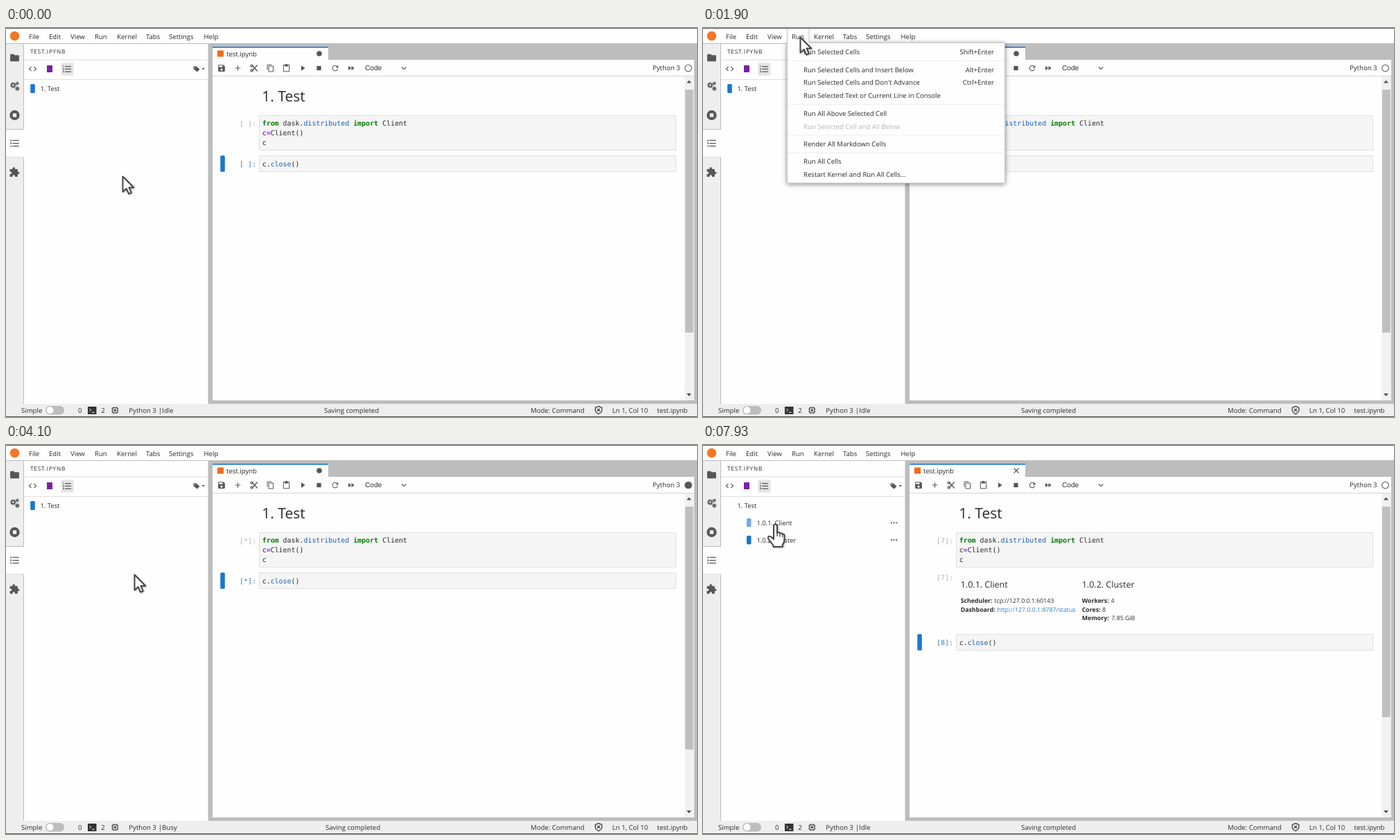
Animation, 997 px wide and 562 px high, one loop 8 s. Source, as an HTML page:

```html
<!DOCTYPE html>
<html lang="en">
<head>
<meta charset="utf-8">
<title>Notebook outline</title>
<style>
html, body { margin: 0; width: 100%; height: 100%; overflow: hidden; background: #fefefe; }
svg { display: block; width: 100vw; height: 100vh; }
text { font: 9.6px "Open Sans", "Noto Sans", sans-serif; fill: #2b2b2b; white-space: pre; text-rendering: geometricPrecision; }
.code { font: 9.94px "DejaVu Sans Mono", monospace; }
.keyword { font-weight: bold; fill: #008000; }
.operator { font-weight: bold; fill: #aa22ff; }
.property { fill: #1a5fb4; }
.prompt { fill: #b0b0b0; }
.active { fill: #307fc1; }
.toc { font-size: 9.4px; }
.h1 { font-size: 21px; }
.h3 { font-size: 12.5px; font-weight: 500; }
.out { font-size: 8.78px; }
.bold { font-weight: bold; }
.link { fill: #2a7fcb; }
.caps { font-size: 8.2px; letter-spacing: .8px; }
.select { font: 10.1px "Liberation Sans", Arial, sans-serif; }
.disabled { fill: #b5b5b5; }
.menu-box { filter: drop-shadow(0 1px 3px rgba(0,0,0,.35)) drop-shadow(0 2px 4px rgba(0,0,0,.15)); }
#cursor { filter: drop-shadow(1px 1px 1px rgba(0,0,0,.3)); }
</style>
</head>
<body>
<svg id="stage" viewBox="0 0 997 562" preserveAspectRatio="none"></svg>
<script>
const LOOP = 8000;
const WHITE = '#fefefe', GRAY = '#bdbdbd', PALE = '#eeeeee', INK = '#565656';
const BLUE = '#1976d2', LIGHT_BLUE = '#72a9e6';

const text = (x, y, content, cls = '', extra = '') =>
  `<text x="${x}" y="${y}" class="${cls}" ${extra}>${content}</text>`;
const rect = (x, y, w, h, fill, extra = '') =>
  `<rect x="${x}" y="${y}" width="${w}" height="${h}" fill="${fill}" ${extra}/>`;
const circle = (x, y, r, fill, extra = '') =>
  `<circle cx="${x}" cy="${y}" r="${r}" fill="${fill}" ${extra}/>`;
const path = (d, fill, extra = '') => `<path d="${d}" fill="${fill}" ${extra}/>`;
const line = (d, width = 1, color = INK, extra = '') =>
  path(d, 'none', `stroke="${color}" stroke-width="${width}" ${extra}`);
const group = (id, content) => `<g id="${id}">${content}</g>`;
// Icons are drawn on a 24 unit grid and centred on (x, y).
const icon = (x, y, size, d) =>
  path(d, INK, `fill-rule="evenodd" transform="translate(${x - size / 2} ${y - size / 2}) scale(${size / 24})"`);
const span = (cls, content) => `<tspan class="${cls}">${content}</tspan>`;

const gear = (x, y, r) =>
  circle(x, y, r, 'none', `stroke="${INK}" stroke-width="1.8"`) +
  circle(x, y, r + 1.3, 'none', `stroke="${INK}" stroke-width="1.5" pathLength="16" stroke-dasharray="1 1"`);

const ICONS = {
  folder: 'M10 4H4c-1.1 0-2 .9-2 2v12c0 1.1.9 2 2 2h16c1.1 0 2-.9 2-2V8c0-1.1-.9-2-2-2h-8z',
  list: 'M2 4h3v3H2zM2 10.5h3v3H2zM2 17h3v3H2zM7 4.5h15v2H7zM7 11h15v2H7zM7 17.5h15v2H7z',
  puzzle: 'M20.5 11H19V7a2 2 0 0 0-2-2h-4V3.5a2.5 2.5 0 0 0-5 0V5H4a2 2 0 0 0-2 2v3.8h1.5a2.7 2.7 0 0 1 0 5.4H2V20a2 2 0 0 0 2 2h3.8v-1.5a2.7 2.7 0 0 1 5.4 0V22H17a2 2 0 0 0 2-2v-4h1.5a2.5 2.5 0 0 0 0-5z',
  code: 'M9.4 16.6L4.8 12l4.6-4.6L8 6l-6 6 6 6zM14.6 16.6l4.6-4.6-4.6-4.6L16 6l6 6-6 6z',
  numbered: 'M2 17h2v.5H3v1h1v.5H2v1h3v-4H2zM3 8h1V4H2v1h1zM2 11h1.8L2 13.1v.9h3v-1H3.2L5 10.9V10H2zM7 5v2h14V5zM7 19h14v-2H7zM7 13h14v-2H7z',
  tag: 'M2 4h9l11 9.500-8.500 8.500L2 12zM6 6a1.500 1.500 0 1 0 .1 0z',
  save: 'M17 3H5a2 2 0 0 0-2 2v14a2 2 0 0 0 2 2h14a2 2 0 0 0 2-2V7zM12 19a3 3 0 1 1 0-6 3 3 0 0 1 0 6zM15 9H5V5h10z',
  add: 'M19 13h-6v6h-2v-6H5v-2h6V5h2v6h6z',
  copy: 'M16 1H4a2 2 0 0 0-2 2v14h2V3h12zM19 5H8a2 2 0 0 0-2 2v14a2 2 0 0 0 2 2h11a2 2 0 0 0 2-2V7a2 2 0 0 0-2-2zM19 21H8V7h11z',
  paste: 'M19 2h-4.2a3 3 0 0 0-5.600 0H5a2 2 0 0 0-2 2v16a2 2 0 0 0 2 2h14a2 2 0 0 0 2-2V4a2 2 0 0 0-2-2zM19 20H5V4h2v3h10V4h2z',
  play: 'M8 5v14l11-7z',
  stop: 'M6 6h12v12H6z',
  refresh: 'M17.65 6.35A8 8 0 1 0 19.73 14h-2.08A6 6 0 1 1 12 6c1.66 0 3.14.69 4.22 1.78L13 11h7V4z',
  forward: 'M4 18l8.5-6L4 6zM13 6v12l8.5-6z'
};

function frameMarkup() {
  return rect(0, 0, 997, 562, WHITE)
    + rect(0, 22, 997, 521, GRAY)
    + rect(0, 23, 25, 520, PALE)
    + rect(25, 23, 1, 520, GRAY)
    + rect(26, 23, 265.5, 520, WHITE)
    + rect(0, 146, 26, 41, GRAY) + rect(0, 147, 26, 39.5, WHITE)
    + rect(298, 27, 167, 20, WHITE) + rect(298, 27, 167, 1.6, BLUE)
    + rect(298, 46, 695, 492, WHITE) + rect(298, 69, 695, 1, '#d4d4d4')
    + rect(979, 70, 14, 468, '#f1f1f1')
    + path('M982 79.500h7l-3.500-4zM982 528h7l-3.500 4z', '#505050')
    + rect(0, 543, 997, 18, PALE)
    + rect(0, 0, 997, .8, '#333') + rect(0, 561, 997, 1, '#555');
}

function leftMarkup() {
  return circle(12.5, 11.5, 6.8, '#f37726')
    + icon(12.5, 43, 15.5, ICONS.folder)
    + gear(10.3, 82.6, 2.3) + gear(16.3, 87.6, 1.3) + gear(16.3, 80, .7)
    + circle(12.5, 126, 7.2, INK) + rect(9.8, 123.3, 5.4, 5.4, PALE)
    + icon(12.5, 166.5, 15, ICONS.list)
    + icon(12.2, 208.3, 16, ICONS.puzzle)
    + text(35, 37.3, 'TEST.IPYNB', 'caps')
    + rect(26, 45.5, 265.5, 1, '#dedede') + rect(26, 74, 265.5, 1, '#dedede')
    + icon(38.5, 59, 14, ICONS.code)
    + rect(59, 54, 8, 10, '#7b1fa2')
    + rect(79.5, 50.5, 18, 18, '#e4e4e4') + icon(88.3, 59.3, 15, ICONS.numbered)
    + icon(275, 59, 11, ICONS.tag) + path('M282.500 58h4.500l-2.250 2.500z', INK)
    + text(49.5, 91.2, '1. Test', 'toc')
    + rect(35.2, 81, 6.6, 13, BLUE, 'id="mark1" rx="1.5"');
}

function tocMarkup() {
  const row = (y, label, id) => text(77.5, y + 3.8, label, 'toc')
    + [271.8, 275.5, 279.2].map(x => circle(x, y, 1.1, INK)).join('')
    + rect(63, y - 6.3, 6.5, 12.6, BLUE, `id="${id}" rx="1.5"`);
  return row(112.3, '1.0.1. Client', 'mark2') + row(137.2, '1.0.2. Cluster', 'mark3');
}

function toolbarMarkup() {
  const tools = [[311, 'save', 13], [334.5, 'add', 13], [381.5, 'copy', 12], [404.5, 'paste', 12.5],
    [428, 'play', 12.5], [451.5, 'stop', 12.5], [475, 'refresh', 13], [498, 'forward', 12]];
  return rect(305, 32.5, 9, 9, '#ef6c1a') + text(318, 41, 'test.ipynb')
    + circle(452, 37, 3.8, INK, 'id="dirty"')
    + group('close', line('M448.500 33.500l7 7m0-7l-7 7', 1.2))
    + tools.map(([x, name, size]) => icon(x, 58, size, ICONS[name])).join('')
    + line('M355 54l7.800 8.500M362.800 53.500l-7.800 8.500', 1.3)
    + [54.6, 61.4].map(y => circle(354.6, y, 1.6, 'none', `stroke="${INK}" stroke-width="1.200"`)).join('')
    + text(518, 61.3, 'Code', 'select') + line('M570.800 56.500l3.200 3 3.200-3', 1.2)
    + text(933, 61, 'Python 3')
    + circle(984.5, 58, 4.8, 'none', `id="kernel" stroke="${INK}" stroke-width="1.100"`);
}

function notebookMarkup() {
  const border = 'stroke="#e0e0e0"';
  return text(369.3, 106.3, '1. Test', 'h1')
    + text(337, 141.5, '', 'code prompt', 'id="prompt1"')
    + rect(365.5, 126.5, 601, 50, '#f5f5f5', border)
    + text(369.7, 141.3, `${span('keyword', 'from')} dask.${span('property', 'distributed')} ${span('keyword', 'import')} Client`, 'code')
    + text(369.7, 155.3, `c${span('operator', '=')}Client()`, 'code')
    + text(369.7, 169.3, 'c', 'code')
    + group('output',
      text(337, 195.3, '[7]:', 'code prompt')
      + text(371.7, 205.6, '', 'h3', 'id="head1"') + text(546.7, 205.6, '', 'h3', 'id="head2"')
      + text(371.7, 228.2, 'Scheduler:', 'out bold') + text(420.4, 228.2, 'tcp://127.0.0.1:60143', 'out')
      + text(371.7, 241, 'Dashboard:', 'out bold') + text(424.3, 241, 'http://127.0.0.1:8787/status', 'out link')
      + text(546.7, 228.2, 'Workers:', 'out bold') + text(588.5, 228.2, '4', 'out')
      + text(546.7, 241, 'Cores:', 'out bold') + text(576, 241, '8', 'out')
      + text(546.7, 253.3, 'Memory:', 'out bold') + text(589.3, 253.3, '7.85 GiB', 'out'))
    + group('cell2',
      rect(309.3, 184.3, 6.5, 23.4, BLUE, 'rx="1.500"')
      + text(337, 199.7, '', 'code active', 'id="prompt2"')
      + rect(365.5, 184.5, 601, 23, '#f5f5f5', border)
      + text(369.7, 199.5, `c.${span('property', 'close')}()`, 'code'))
    + rect(980, 89, 11.7, 351, '#bfbfbf', 'id="thumb"');
}

function statusMarkup() {
  const y = 555.5;
  return text(22, y, 'Simple')
    + rect(57, 546, 27, 12.5, GRAY, 'rx="6.200"') + circle(63.5, 552.2, 5, WHITE)
    + text(104, y, '0')
    + rect(118, 547, 12.5, 11, '#333') + line('M120.500 550l2.200 2-2.200 2M124 555.300h3.500', 1, WHITE)
    + text(137.3, y, '2')
    + line('M152 550.500h10.500M152 554h10.500M155.500 547v10.500M159 547v10.500', 1.1)
    + rect(153.8, 548.8, 7, 7, PALE, `stroke="${INK}" stroke-width="1.300"`) + rect(155.7, 550.7, 3.2, 3.2, INK)
    + text(177.3, y, 'Python 3') + text(219.9, y, '|') + text(225.3, y, '', '', 'id="state"')
    + text(459, y, '', '', 'id="saving"')
    + text(757, y, 'Mode: Command')
    + line('M855 546.600l4.800 1.800v3.200q0 4-4.800 6-4.800-2-4.800-6v-3.200z', 1.2, '#333')
    + line('M853 549.800l4 4m0-4l-4 4', 1.2, '#333')
    + text(874.8, y, 'Ln 1, Col 10') + text(939.5, y, 'test.ipynb');
}

const MENU = [
  [34.5, 'Run Selected Cells', 'Shift+Enter'],
  [60, 'Run Selected Cells and Insert Below', 'Alt+Enter'],
  [78.8, "Run Selected Cells and Don't Advance", 'Ctrl+Enter'],
  [97.5, 'Run Selected Text or Current Line in Console'],
  [123, 'Run All Above Selected Cell'],
  [142, 'Run Selected Cell and All Below'],
  [167.3, 'Render All Markdown Cells'],
  [192.7, 'Run All Cells'],
  [211.5, 'Restart Kernel and Run All Cells...']
];
const DISABLED_ITEM = 5, RUN_ALL_ITEM = 7, ROW_HALF = 9.4;

function menuMarkup() {
  return rect(121.5, 21.5, 314, 202.5, WHITE, `class="menu-box" stroke="${GRAY}" stroke-width=".8"`)
    + rect(121.5, 1, 31.5, 21.5, WHITE) + line('M121.500 1v22M153 1v20.500', .9, GRAY)
    + rect(122, 0, 313, ROW_HALF * 2, '#ededed', 'id="row"')
    + [46.8, 109.8, 154.5, 180].map(y => rect(122, y, 313, .8, '#e8e8e8')).join('')
    + MENU.map(([y, label, keys], i) => text(145, y + 3.6, label, i === DISABLED_ITEM ? 'disabled' : '')
      + (keys ? text(420, y + 3.6, keys, '', 'text-anchor="end"') : '')).join('');
}

const menuBar = [[33, 'File'], [62, 'Edit'], [93, 'View'], [128, 'Run'], [160, 'Kernel'],
  [202, 'Tabs'], [235, 'Settings'], [285.5, 'Help']].map(([x, label]) => text(x, 16, label)).join('');

const outline = 'stroke="#444" stroke-width="2" stroke-linejoin="round"';
const cursorMarkup =
  group('arrow', path('M.5 .5V22.500L5.700 18 9.200 25.500 12.800 23.900 9.500 16.500H16.300Z', WHITE, outline))
  + group('hand', path('M-2.500 2a2.500 2.500 0 0 1 5 0v10q2.500-2 4 .6q2.500-1.200 3.600 1q2.800-.4 2.800 2.400v6q0 4-2.600 7v3H-3v-2l-7-9q-1.600-3 .8-4 2-.5 4 1.600l2.700 2.500z', WHITE, outline)
    + line('M2.500 12v5M6.500 13v4.500M10 14v4', 1.3, '#444'));

document.getElementById('stage').innerHTML = frameMarkup() + leftMarkup() + group('toc', tocMarkup())
  + toolbarMarkup() + notebookMarkup() + statusMarkup()
  + rect(121.5, 1, 31.5, 21, '#ebebeb', 'id="runHover"')
  + group('menu', menuMarkup()) + menuBar + group('cursor', cursorMarkup);

const el = {};
document.querySelectorAll('#stage [id]').forEach(node => { el[node.id] = node; });
const show = (node, on) => node.setAttribute('display', on ? 'inline' : 'none');
const set = (node, name, value) => node.setAttribute(name, value);
const between = (t, from, to) => t >= from && t < to;
const ease = p => p < .5 ? 2 * p * p : 1 - 2 * (1 - p) ** 2;

const MOVES = [
  { start: 600, end: 1600, to: [140, 13] },
  { start: 2400, end: 3400, to: [185, 187] },
  { start: 7370, end: 7930, to: [104.5, 115] }
];

function cursorAt(t) {
  let [x, y] = [168, 214];
  for (const { start, end, to } of MOVES) {
    const p = ease(Math.min(1, Math.max(0, (t - start) / (end - start))));
    x += (to[0] - x) * p;
    y += (to[1] - y) * p;
  }
  return [x, y];
}

function render(t) {
  const [x, y] = cursorAt(t);
  const busy = between(t, 4100, 7160), hasOutput = t >= 5160, numbered = t >= 6200, saved = t >= 7600;

  const onToc = numbered && y < 150;
  set(el.cursor, 'transform', `translate(${x} ${y})`);
  show(el.arrow, !onToc);
  show(el.hand, onToc);

  show(el.runHover, between(t, 1190, 1900));
  show(el.menu, between(t, 1900, 3900));
  const hovered = t >= 3210 ? RUN_ALL_ITEM : MENU.findIndex(([mid]) => Math.abs(y - mid) <= ROW_HALF);
  show(el.row, hovered >= 0 && hovered !== DISABLED_ITEM);
  if (hovered >= 0) set(el.row, 'y', MENU[hovered][0] - ROW_HALF);

  show(el.mark1, !numbered);
  set(el.mark1, 'fill', between(t, 1040, 1110) ? LIGHT_BLUE : BLUE);
  show(el.toc, numbered);
  show(el.mark2, onToc && y < 125);
  set(el.mark2, 'fill', LIGHT_BLUE);
  set(el.mark3, 'fill', onToc && y >= 125 ? LIGHT_BLUE : BLUE);

  el.prompt1.textContent = hasOutput ? '[7]:' : busy ? '[*]:' : '[ ]:';
  el.prompt2.textContent = busy ? '[*]:' : hasOutput ? '[8]:' : '[ ]:';
  show(el.output, hasOutput);
  el.head1.textContent = (numbered ? '1.0.1. ' : '') + 'Client';
  el.head2.textContent = (numbered ? '1.0.2. ' : '') + 'Cluster';
  set(el.cell2, 'transform', `translate(0 ${hasOutput ? 89 : 0})`);
  set(el.thumb, 'height', hasOutput ? 304 : 351);

  set(el.kernel, 'fill', busy ? INK : 'none');
  el.state.textContent = busy ? 'Busy' : 'Idle';
  set(el.saving, 'x', busy ? 461 : 459);
  el.saving.textContent = between(t, 7560, 7700) ? 'Saving started' : 'Saving completed';
  show(el.dirty, !saved);
  show(el.close, saved);
}

const startTime = performance.now();
function tick() {
  render((performance.now() - startTime) % LOOP);
  requestAnimationFrame(tick);
}
tick();
</script>
</body>
</html>
```
